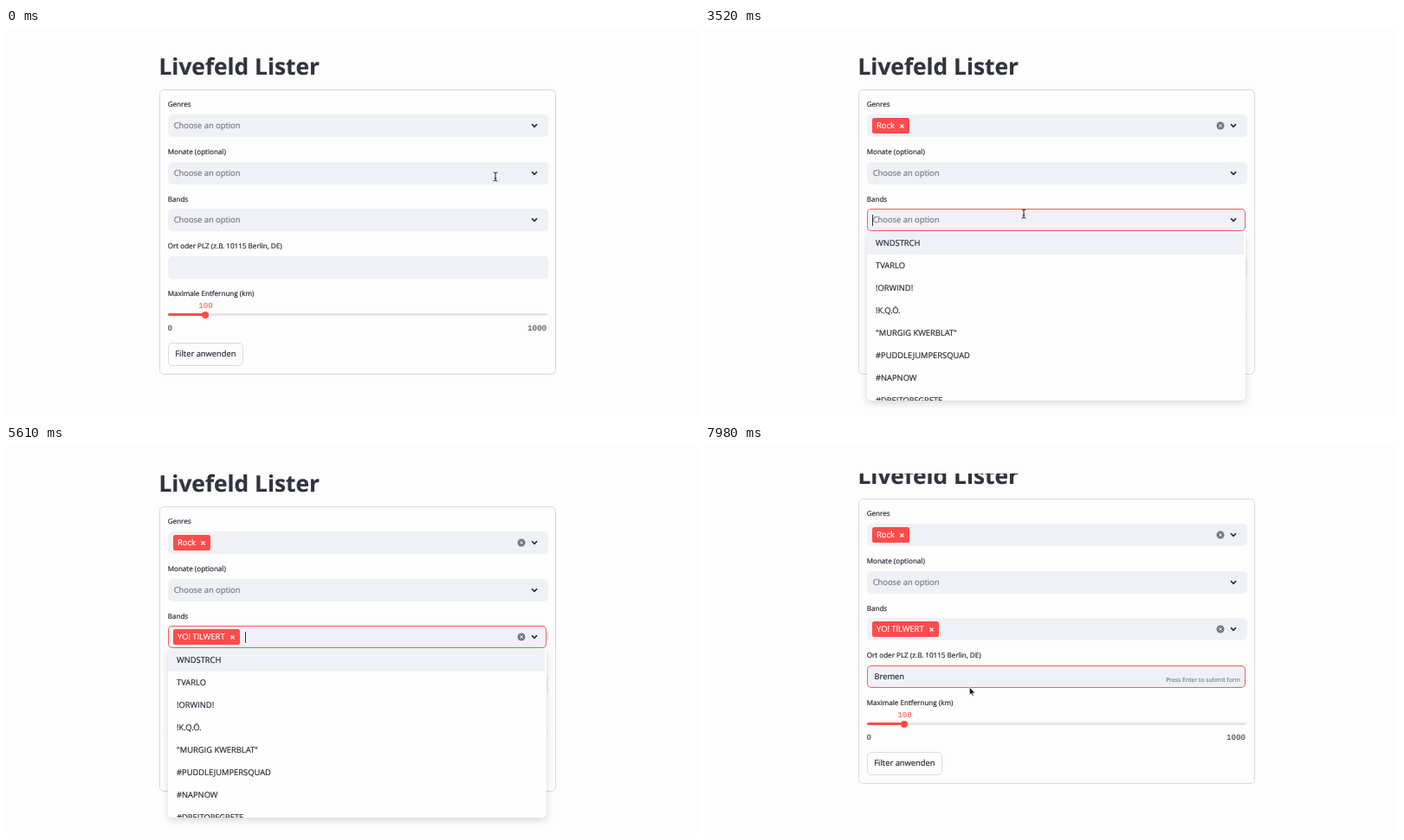
Write an HTML page that moves like this. It is 800 px wide and 450 px high and loops after 8000 ms.

```html
<!DOCTYPE html>
<html lang="de">
<head>
<meta charset="utf-8">
<title>Livefeld Lister</title>
<style>
  html, body { margin: 0; width: 100%; height: 100%; overflow: hidden; background: #fdfdfd; }
  #stage {
    position: relative; width: 800px; height: 450px; overflow: hidden; background: #fdfdfd;
    color: #262832; font: 9.35px "Open Sans", "Noto Sans", sans-serif;
    text-rendering: geometricPrecision; -webkit-text-stroke: .18px; white-space: pre;
  }
  #stage div, #stage svg { position: absolute; box-sizing: border-box; }
  #page { inset: 0; }
  #header { left: 0; top: 0; width: 800px; height: 33px; background: #fdfdfd; }
  .title { left: 176.5px; top: 23.5px; font-size: 26.3px; line-height: 40px; font-weight: 700; color: #31333f; }
  .panel { left: 176.5px; top: 71px; width: 458px; height: 330px; border: 1px solid #d9dadd; border-radius: 5.5px; }
  .label { left: 186.7px; font-size: 8.1px; line-height: 14px; }
  .field { left: 187px; width: 439px; height: 26px; border-radius: 5px; background: #f0f1f6; line-height: 26px; }
  .field.focus { width: 437px; box-shadow: inset 0 0 0 1px #ff5a5a; }
  .row { left: 6px; top: 0; height: 26px; display: flex; align-items: center; }
  .row.text { left: 8.5px; }
  .hint { color: #777881; padding-left: .7px; }
  .caret { width: 1px; height: 13px; margin-right: -1px; background: #31333f; }
  .chip {
    display: flex; align-items: center; height: 18.5px; line-height: 18.5px; margin: 0 6.5px 0 -.5px;
    padding: 0 5.6px; gap: 6.5px; border-radius: 2.6px; background: #ff4b4b; color: #fff;
  }
  #stage .chip svg { position: static; }
  .enter { right: 6px; top: 13px; font-size: 6.87px; line-height: 10px; color: #7f8089; }
  .menu {
    left: 187px; width: 437px; height: 195.5px; overflow: hidden; background: #fefefe;
    border-radius: 0 0 5px 5px; box-shadow: 0 3px 9px rgba(0, 0, 0, .15);
  }
  .menu p { margin: 0; padding-left: 10px; height: 26px; line-height: 26px; }
  .menu p:first-child { margin-right: 2px; background: #f0f1f6; }
  .mono { font: 9.2px/12px "Liberation Mono", monospace; -webkit-text-stroke: 0; }
  .track { left: 187px; top: 330.4px; height: 3px; border-radius: 2px; }
  .thumb { left: 226.4px; top: 328px; width: 8px; height: 8px; border-radius: 50%; background: #ff4b4b; }
  .button {
    left: 187px; top: 364px; width: 87px; height: 26.5px; border: 1px solid #dcdde0;
    border-radius: 5px; line-height: 24.5px; padding-left: 7.3px;
  }
  #pointer { left: 0; top: 0; overflow: visible; }
</style>
</head>
<body>
<div id="stage">
  <div id="page">
    <div class="title">Livefeld Lister</div>
    <div class="panel"></div>
    <div class="label" style="top:82.3px">Genres</div>
    <div class="label" style="top:137px">Monate (optional)</div>
    <div class="label" style="top:191.6px">Bands</div>
    <div class="label" style="top:246.3px">Ort oder PLZ (z.B. 10115 Berlin, DE)</div>
    <div class="label" style="top:301px">Maximale Entfernung (km)</div>
    <div id="genres" class="field" style="top:100px"></div>
    <div id="months" class="field" style="top:154.6px"></div>
    <div id="bands" class="field" style="top:209.2px"></div>
    <div id="place" class="field" style="top:264px"></div>
    <div class="mono" style="left:222.2px;top:315.5px;color:#ff4b4b">100</div>
    <div class="track" style="width:437.5px;background:#e6e7eb"></div>
    <div class="track" style="width:43px;background:#ff4b4b"></div>
    <div class="thumb"></div>
    <div class="mono" style="left:186.5px;top:341.5px">0</div>
    <div class="mono" style="left:602px;top:341.5px">1000</div>
    <div class="button">Filter anwenden</div>
    <div id="menu" class="menu"></div>
  </div>
  <div id="header"></div>
  <svg id="pointer" width="1" height="1">
    <path id="arrow" d="M0 0V9.3L2.1 7.4 3.6 10.8 5 10.2 3.6 6.9H6.5Z" fill="#111" stroke="#fff" stroke-width=".7"/>
    <path id="beam" d="M-2.3 -5Q0 -5 0 -3.6V3.6Q0 5 -2.3 5M2.3 -5Q0 -5 0 -3.6M0 3.6Q0 5 2.3 5M-1.2 1.8H1.2" fill="none" stroke="#222"/>
  </svg>
</div>
<script>
const LOOP = 8000;
const $ = id => document.getElementById(id);

const genres = {
  all: ["Alternative", "Blues", "Country", "Electro", "Folk", "Hip Hop", "Indie", "Jazz"],
  hits: ["Rock", "Rockabilly", "Rock 'n' Roll", "Pop Rock", "70s Rock", "Surf Rock", "Punk Rock", "Post Rock"],
  word: "Roc", chip: "Rock", top: 126,
  open: 770, keys: [1150, 1280, 1400], pick: 1900, close: 2420
};
const bands = {
  all: ["WNDSTRCH", "TVARLO", "!ORWIND!", "!K.Q.Ö.", "\"MURGIG KWERBLAT\"", "#PUDDLEJUMPERSQUAD", "#NAPNOW", "#DREITOPFGRETE"],
  hits: ["YO! TILWERT", "YONDER TILLAGE", "YO YO TILBITS", "YORBINK & TILVOTT", "YOUNG TILTERS", "YOLINDE TILWICHT",
    "VELVET OTTERS AND YORIK TILDLING", "FRAU YOL & IHRE TILTENBÄND"],
  word: "yo til", chip: "YO! TILWERT", top: 235.5,
  open: 3150, keys: [3740, 3850, 3970, 4110, 4250, 4380], pick: 5100, close: 5800
};
const place = { word: "Bremen", open: 6200, keys: [6960, 7060, 7150, 7240, 7330, 7420] };
const scroll = { from: 5840, to: 5980, distance: 9 };

// Each path is one visible stretch of [time, x, y] stops.
const pointerPaths = [
  [[0, 565, 172], [100, 565, 172], [600, 470, 115], [1140, 470, 115]],
  [[2080, 470, 115], [2380, 672, 115], [2560, 630, 150], [3050, 368, 215], [3730, 368, 215]],
  [[5660, 420, 215], [5800, 735, 290], [6000, 640, 285], [6200, 322, 263], [6950, 322, 263]],
  [[7780, 322, 263], [7900, 305.3, 280], [LOOP, 305.3, 280]]
];
const fieldTops = [100, 154.6, 209.2, 264];

const escapeText = s => s.replace(/&/g, "&amp;").replace(/</g, "&lt;");
const ease = p => p * p * (3 - 2 * p);
const clamp = p => Math.min(1, Math.max(0, p));

const cross = '<svg width="5" height="5"><path d="M.5 .5L4.5 4.5M4.5 .5L.5 4.5" stroke="#fff" stroke-width="1.1"/></svg>';
const chevron = '<svg style="left:419px;top:10px" width="8" height="6"><path d="M1 1.2L4 4.3 7 1.2" fill="none" stroke="#25262f" stroke-width="1.6"/></svg>';
const clear = '<svg style="left:403px;top:8.3px" width="10" height="10"><circle cx="5" cy="5" r="4.5" fill="#777982"/><path d="M3.4 3.4L6.6 6.6M6.6 3.4L3.4 6.6" stroke="#fff"/></svg>';

function setHtml(el, html) {
  if (el.markup !== html) el.innerHTML = el.markup = html;
}

function caretHtml(t, marks) {
  const last = Math.max(...marks.filter(m => m <= t));
  const shown = (t - last) % 1060 < 530;
  return `<span class="caret" style="opacity:${+shown}"></span>`;
}

const typed = (t, f) => f.word.slice(0, f.keys.filter(k => k <= t).length);

function drawSelect(el, t, f) {
  const focus = t >= f.open && t < f.close;
  const picked = t >= f.pick;
  const query = picked ? "" : typed(t, f);
  const caret = focus ? caretHtml(t, [f.open, ...f.keys, f.pick]) : "";
  const chip = picked ? `<span class="chip">${f.chip}${cross}</span>` : "";
  const hint = picked || query ? "" : '<span class="hint">Choose an option</span>';
  el.classList.toggle("focus", focus);
  setHtml(el, `<div class="row">${chip}<span>${query}</span>${caret}${hint}</div>${picked || query ? clear : ""}${chevron}`);
  return focus && { top: f.top, items: query ? f.hits : f.all };
}

function drawMenu(menu) {
  const el = $("menu");
  el.style.display = menu ? "block" : "none";
  if (!menu) return;
  el.style.top = menu.top + "px";
  setHtml(el, menu.items.map(s => `<p>${escapeText(s)}</p>`).join(""));
}

function drawPlace(t) {
  const focus = t >= place.open;
  $("place").classList.toggle("focus", focus);
  setHtml($("place"), focus
    ? `<div class="row text"><span>${typed(t, place)}</span>${caretHtml(t, [place.open, ...place.keys])}</div><div class="enter">Press Enter to submit form</div>`
    : "");
}

function drawPointer(t, shift) {
  const path = pointerPaths.find(p => t >= p[0][0] && t < p[p.length - 1][0]);
  $("pointer").style.display = path ? "block" : "none";
  if (!path) return;
  const i = path.findIndex(stop => stop[0] > t);
  const [t0, x0, y0] = path[i - 1], [t1, x1, y1] = path[i];
  const p = ease((t - t0) / (t1 - t0));
  const x = x0 + (x1 - x0) * p, y = y0 + (y1 - y0) * p;
  const overField = x > 187 && x < 626 && fieldTops.some(top => y + shift > top && y + shift < top + 24);
  $("beam").style.display = overField ? "" : "none";
  $("arrow").style.display = overField ? "none" : "";
  $("pointer").style.transform = `translate(${x}px, ${y}px)`;
}

function render(t) {
  const shift = scroll.distance * ease(clamp((t - scroll.from) / (scroll.to - scroll.from)));
  $("page").style.transform = `translateY(${-shift}px)`;
  const genreMenu = drawSelect($("genres"), t, genres);
  const bandMenu = drawSelect($("bands"), t, bands);
  drawMenu(genreMenu || bandMenu);
  drawPlace(t);
  drawPointer(t, shift);
}

setHtml($("months"), `<div class="row"><span class="hint">Choose an option</span></div>${chevron}`);
const start = performance.now();
function tick() {
  render((performance.now() - start) % LOOP);
  requestAnimationFrame(tick);
}
tick();
</script>
</body>
</html>
```
